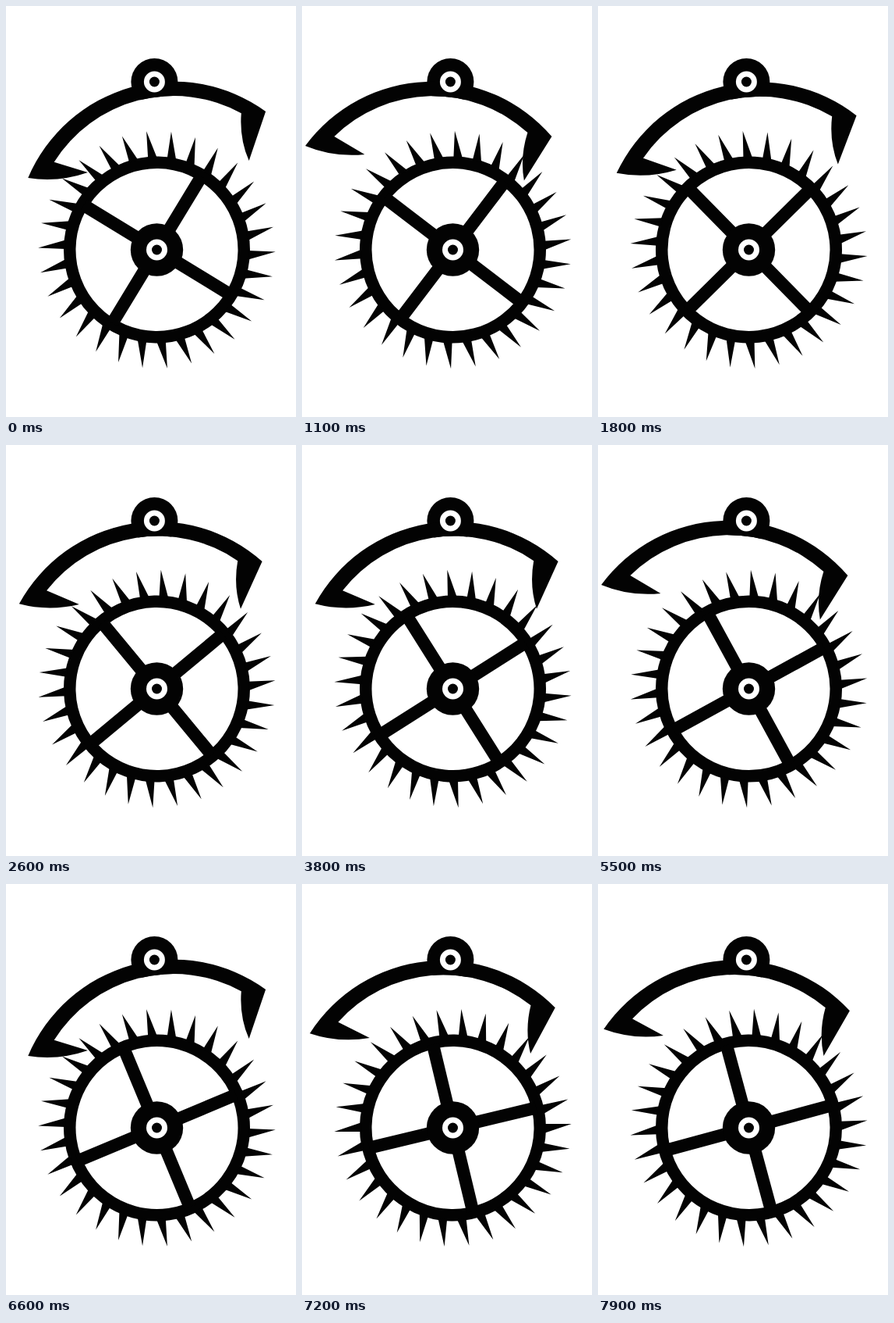
Write an HTML page that moves like this. It is 372 by 526 pixels and loops after 8 s.

```html
<!DOCTYPE html>
<html lang="en">
<head>
<meta charset="utf-8">
<title>Anchor escapement</title>
<style>
  html, body { margin: 0; width: 100%; height: 100%; overflow: hidden; background: #fff; }
  svg { display: block; width: 372px; height: 526px; }
</style>
</head>
<body>
<svg viewBox="0 0 372 526" fill="#030303">
  <circle cx="190.4" cy="97" r="30"/>
  <g id="anchor">
    <!-- the hollow under the arch trims the boss -->
    <path d="M41.4 167A181 181 0 0 1 289.4 162Z" fill="#fff"/>
    <path d="M4.2 179A202.4 202.4 0 0 1 320.4 167L284.9 223.5Q279.4 193 289.4 162A181 181 0 0 0 41.4 167L80.4 190Q40.4 194 4.2 179Z"/>
  </g>
  <g transform="translate(190.4 97)">
    <circle r="13.5" fill="#fff"/>
    <circle r="6.5"/>
  </g>
  <g transform="translate(193.5 312)">
    <g id="wheel">
      <circle r="111.75" fill="none" stroke="#030303" stroke-width="15.5"/>
      <path d="M-110 0H110M0 -110V110" transform="rotate(30.4)" stroke="#030303" stroke-width="16.2"/>
      <path id="teeth"/>
    </g>
    <circle r="33.7"/>
    <circle r="13.5" fill="#fff"/>
    <circle r="6.5"/>
  </g>
</svg>
<script>
  const STEP = 100, STEPS = 80, BEAT = 22, TEETH = 30, PITCH = 360 / TEETH;

  // Wheel angle through one swing: impulse, drop and recoil on each pallet.
  const swing = [
    0.7, 0.95, 1.7, 3.05, 5.1, 7.95, 10.2, 10.1, 8.46, 7.45, 6.92,
    6.76, 6.92, 7.45, 8.46, 10.1, 12.4, 15.3, 16.8, 15.05, 13.7, 12.95
  ];

  const wheel = document.getElementById('wheel');
  const anchor = document.getElementById('anchor');

  const polar = (r, deg) => {
    const a = deg * Math.PI / 180;
    return (r * Math.cos(a)).toFixed(2) + ' ' + (r * Math.sin(a)).toFixed(2);
  };

  const tooth = a => `M${polar(117, a - 0.5)}L${polar(152.3, a)}L${polar(117, a + 5.3)}Z`;
  document.getElementById('teeth').setAttribute('d',
    Array.from({ length: TEETH }, (_, i) => tooth(i * PITCH)).join(''));

  function draw(now) {
    const k = Math.floor(now / STEP) % STEPS + 1;
    const turn = PITCH * Math.floor(k / BEAT) + swing[k % BEAT];
    const tilt = -6.7 - 7 * Math.cos(2 * Math.PI * k / BEAT);
    wheel.setAttribute('transform', `rotate(${turn})`);
    anchor.setAttribute('transform', `rotate(${tilt} 190.4 97)`);
  }

  const start = performance.now();
  function tick() {
    draw(performance.now() - start);
    requestAnimationFrame(tick);
  }
  tick();
</script>
</body>
</html>
```
